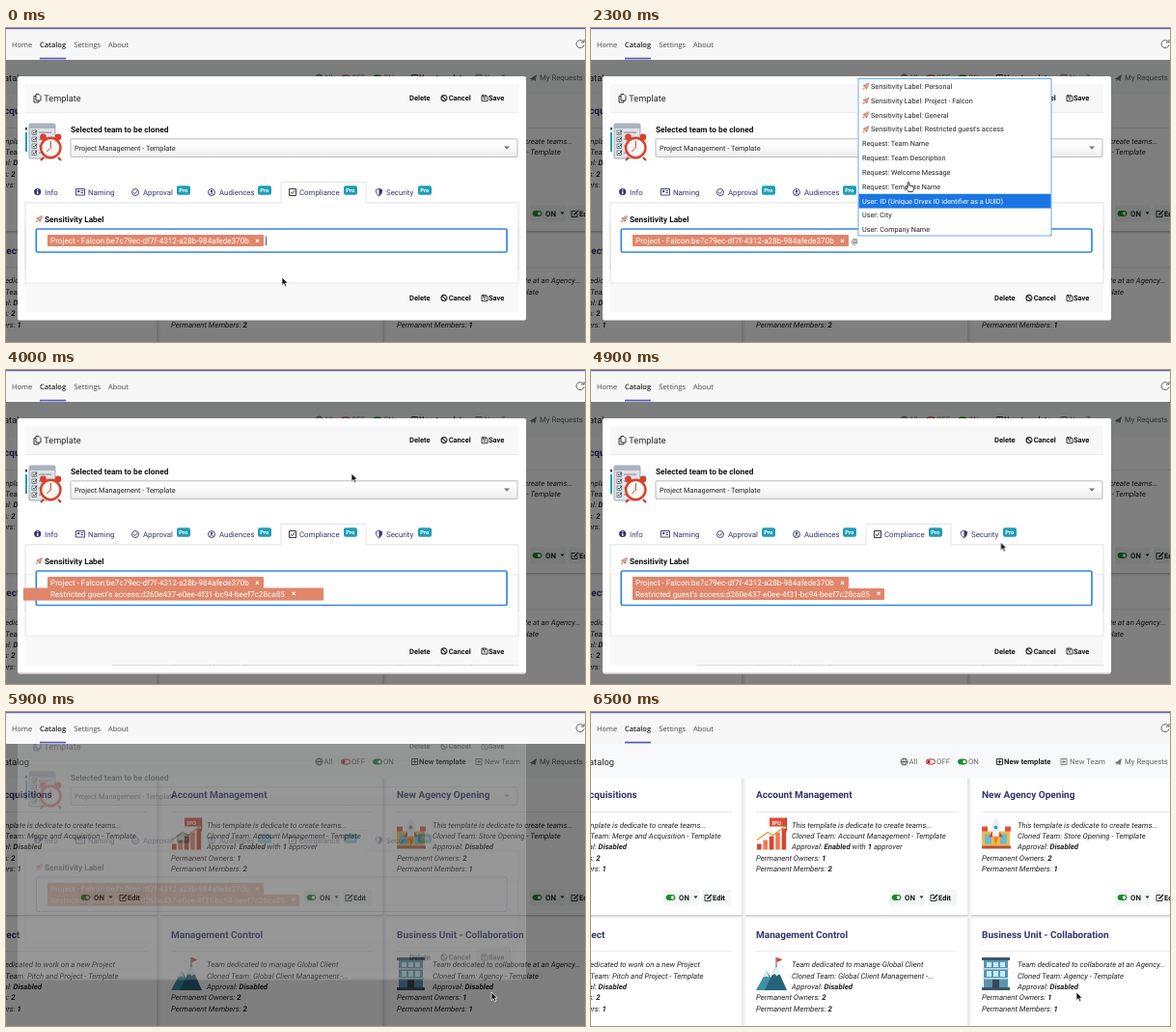
Animation, 600 px wide and 325 px high, one loop 6600 ms. Source, as an HTML page:

```html
<!DOCTYPE html>
<html lang="en">
<head>
<meta charset="utf-8">
<title>Template dialog</title>
<style>
html, body { margin: 0; width: 100%; height: 100%; overflow: hidden; background: #fff; }
svg { display: block; width: 600px; height: 325px; }
text { font: 7.8px Roboto, sans-serif; fill: #222; text-rendering: geometricPrecision; white-space: pre; }
.b, .k { font-weight: 700; }
.nav { font: 7.45px "Open Sans", sans-serif; fill: #444; }
.on { font-weight: 600; fill: #222; }
.title { font-size: 10.05px; font-weight: 700; fill: #34356b; }
.card { font-style: italic; }
.page { font-size: 9.3px; }
.head { font-size: 9.2px; }
.label { font-size: 8.3px; font-weight: 700; fill: #111; }
.btn { font-size: 7.5px; font-weight: 700; fill: #111; }
.sel { font-size: 7.36px; }
.tab { fill: #34356b; font-size: 7.85px; }
.pro { font-size: 5.8px; font-weight: 700; fill: #fff; }
.tag { font-size: 8.13px; fill: #fff; }
.opt { font-size: 7.25px; }
.dim { fill: #666; }
.ln { fill: none; stroke: #222; stroke-width: .9; }
.tl { fill: none; stroke: #34356b; stroke-width: .9; }

.step { animation: 6.6s step-end infinite; }
.move { animation: 6.6s linear infinite; }
#modal { animation-name: close; }
#shade { animation-name: clear; }
#foot, #page2 { animation-name: grow; }
#box { animation-name: box; }
#tag2 { animation-name: late; }
#tag2 rect { animation-name: bump; transform-origin: 173.5px 232px; }
#caret { animation-name: caret; }
#at { animation-name: at; }
#list { animation-name: list; }
#mark { animation-name: mark; }
#hover { animation-name: hover; }
#cursor { animation-name: path; }
#arrow { animation-name: arrow; }
#beam { animation-name: beam; }
#hand { animation-name: hand; }

@keyframes close {
  0%, 87% { opacity: 1; transform: translateY(0); }
  89.39% { opacity: .2; transform: translateY(-37px); }
  90.2%, 100% { opacity: 0; transform: translateY(-44px); }
}
@keyframes clear { 0%, 89.5% { opacity: .5; } 93%, 100% { opacity: 0; } }
@keyframes grow { 0% { transform: none; } 60.5%, 100% { transform: translateY(11.5px); } }
@keyframes box {
  0% { height: 24px; stroke: #3586e4; stroke-width: 1.7; }
  60.5% { height: 35.5px; stroke: #3586e4; stroke-width: 1.7; }
  83.3%, 100% { height: 35.5px; stroke: #8ba9cf; stroke-width: .9; }
}
@keyframes late { 0% { visibility: hidden; } 60.5%, 100% { visibility: visible; } }
@keyframes bump {
  0%, 60.7% { transform: scale(1.192, 1.08); }
  62.8% { transform: scale(.97, 1); }
  64.5%, 100% { transform: none; }
}
@keyframes caret { 0% { visibility: visible; } 22.7%, 100% { visibility: hidden; } }
@keyframes at { 0% { visibility: hidden; } 22.7% { visibility: visible; } 60.5%, 100% { visibility: hidden; } }
@keyframes list { 0% { visibility: hidden; } 24.2% { visibility: visible; } 60.5%, 100% { visibility: hidden; } }
@keyframes mark {
  0% { --i: -1; } 31% { --i: 10; } 32.6% { --i: 9; } 33.4% { --i: 8; }
  36.4% { --i: 7; } 40.9% { --i: 6; } 43.2% { --i: 5; } 45% { --i: 4; } 46.9%, 100% { --i: 3; }
}
@keyframes hover { 0% { visibility: hidden; } 79.5%, 100% { visibility: visible; } }
@keyframes path {
  0%, 1.515% { transform: translate(286px, 258px); }
  3.03%, 7.576% { transform: translate(287px, 244px); }
  10.606% { transform: translate(291px, 224px); }
  16.667%, 28.788% { transform: translate(295px, 218px); }
  31.818% { transform: translate(305px, 199px); }
  34.848% { transform: translate(329px, 159px); }
  37.879%, 39.394% { transform: translate(335px, 148px); }
  48.485%, 50% { transform: translate(350px, 104px); }
  59.091%, 60.606% { transform: translate(358px, 107px); }
  69.697%, 71.212% { transform: translate(385px, 122px); }
  80.303%, 100% { transform: translate(503px, 290px); }
}
@keyframes arrow {
  0% { visibility: visible; } 9.09% { visibility: hidden; } 60.5% { visibility: visible; }
  79.5% { visibility: hidden; } 88.6%, 100% { visibility: visible; }
}
@keyframes beam { 0% { visibility: hidden; } 9.09% { visibility: visible; } 31.06%, 100% { visibility: hidden; } }
@keyframes hand {
  0% { visibility: hidden; } 31.06% { visibility: visible; } 60.5% { visibility: hidden; }
  79.5% { visibility: visible; } 88.6%, 100% { visibility: hidden; }
}
</style>
</head>
<body>
<svg id="stage" viewBox="0 0 600 325"></svg>
<script>
const text = (x, y, s, cls = "") => `<text x="${x}" y="${y}" class="${cls}">${s}</text>`;
const rect = (x, y, w, h, fill, more = "") =>
  `<rect x="${x}" y="${y}" width="${w}" height="${h}" fill="${fill}" ${more}/>`;
const line = (d, cls = "ln", more = "") => `<path d="${d}" class="${cls}" ${more}/>`;
const fill = (d, color) => `<path d="${d}" fill="${color}"/>`;
const dot = (x, y, r, color, more = "") => `<circle cx="${x}" cy="${y}" r="${r}" fill="${color}" ${more}/>`;
const at = (x, y, s) => `<g transform="translate(${x} ${y})">${s}</g>`;
const bold = s => `<tspan class="k">${s}</tspan>`;

const toggle = (x, y, color, on) =>
  rect(x, y - 2.5, 9, 5, on ? color : "#fff", `rx="2.5" stroke="${color}"`) +
  dot(on ? x + 6.5 : x + 2.5, y, 1.7, on ? "#fff" : color);
const pencil = (x, y) => line(`M${x + 4} ${y - 2.5}h-4v6h6v-3`) + line(`M${x + 2.5} ${y + 1.5}l4.5-4.5`, "ln", 'style="stroke-width:1.6"');
const plus = (x, y, cls) => line(`M${x} ${y - 3}h6v6h-6zM${x + 3} ${y - 2}v4m-2-2h4`, cls);
const rocket = (x, y) => at(x, y,
  fill("M7.5 0C4.5 0 2.5 2 1.6 4.2l1.9 1.9C5.7 5.2 7.7 3.2 7.5 0z", "#c9a9a4") +
  fill("M3.4 1.8L.8 3l1.2 1zM5.9 4.2L4.7 6.9l-1-1.3z", "#d5452f") + fill("M1.5 4.8L0 7.7l2.9-1.5z", "#ef8a3a"));

// Card pictures, drawn from their top left corner
const chart = [0, 1, 2, 3, 4].map(i =>
  rect(i * 6.4 + 1, 27 - i * 4, 4.6, 6 + i * 4, i % 2 ? "#ef7b52" : "#d9452f")).join("") +
  line("M1 23L12 15L18 18L31 8", "ln", 'style="stroke:#e39a3c;stroke-width:1.3"') +
  rect(14, 0, 18, 9, "#e04a35") + text(16.5, 7, "IPO", "pro") + rect(31, 0, 1.2, 14, "#8a5a4a");
const store = rect(0, 10, 29, 20, "#f2b84b") + rect(0, 29, 30, 3, "#b5523b") +
  [0, 1, 2, 3, 4].map(i => rect(i * 6, 9, 6, 5, i % 2 ? "#fff" : "#e2503c")).join("") +
  rect(3, 17, 7, 10, "#66bcd0") + rect(19, 17, 7, 10, "#66bcd0") +
  fill("M14.5 0c5 5 5 12 3.5 19h-7C9.500 12 9.500 5 14.500 0z", "#eceff3") +
  dot(14.5, 10, 2, "#3aa0c4") + fill("M11 14l-4 6h4zM18 14l4 6h-4z", "#d9452f") + fill("M12 20h5l-2.500 8z", "#ef7b2a");
const peak = fill("M0 34L11 14L18 25L23 34z", "#3f8fa3") + fill("M9 34L21 9L32 34z", "#24637a") +
  fill("M21 9l-4.500 9.500 3-1.500 2 2.500 2-2 2.500 1zM11 14l-3.500 6.500 3.500-1 2.500 1.500z", "#e7f1f4") +
  rect(20.5, 0, 1, 10, "#555") + fill("M21.500 0l6 2.500-6 2.500z", "#e23b30");
const tower = rect(2, 2, 25, 30, "#5d93ad") + rect(0, 0, 29, 3, "#3c566b") + rect(0, 31, 29, 3, "#3c566b") +
  rect(11, 23, 7, 9, "#34485b") + rect(1, 11, 27, 1.5, "#c9dbe4") + rect(1, 21, 27, 1.5, "#c9dbe4") +
  [5, 12, 19].map(x => rect(x, 5, 5, 5, "#baf0f6") + rect(x, 14, 5, 6, "#baf0f6")).join("");

function card(x, y, c) {
  const [title, desc, team, state, owners, members, pic] = c;
  return at(x, y,
    rect(0, 0, 231, 141.5, "#fff") + rect(0, 141.3, 231, 1, "#bbb") + rect(230.5, 0, .8, 141.5, "#ccc") +
    rect(11, 34, 209, .7, "#ddd") + text(11, 20, title, "title") + at(11, 40.5, pic) +
    text(48, 50.7, desc, "card") + text(48, 62.2, "Cloned Team: " + team, "card") +
    text(48, 73.4, "Approval: " + state, "card") +
    text(11, 84.7, "Permanent Owners: " + bold(owners), "card") +
    text(11, 96, "Permanent Members: " + bold(members), "card") +
    rect(149, 114.5, 37, 17, "#f4f5f6", 'rx="2"') + rect(189, 114.5, 30, 17, "#f4f5f6", 'rx="2"') +
    toggle(152, 123, "#1d8a2c", true) + text(165, 125.7, "ON", "b") +
    fill("M180.500 121.500h4l-2 2.400z", "#222") + pencil(192, 123) + text(200, 125.7, "Edit", "btn"));
}

const off = bold("Disabled");
const rows = [
  [["Merger and Acquisitions", "This template is dedicate to create teams...", "Merge and Acquisition - Template", off, 2, 1, ""],
   ["Account Management", "This template is dedicate to create teams...", "Account Management - Template",
    bold("Enabled") + " with " + bold(1) + " approver", 1, 2, chart],
   ["New Agency Opening", "This template is dedicate to create teams...", "Store Opening - Template", off, 2, 1, store]],
  [["Pitch and Project", "Team dedicated to work on a new Project", "Pitch and Project - Template", off, 2, 1, ""],
   ["Management Control", "Team dedicated to manage Global Client", "Global Client Management -...", off, 2, 2, peak],
   ["Business Unit - Collaboration", "Team dedicated to collaborate at an Agency...", "Agency - Template", off, 1, 1, tower]]
];

const catalog = rect(0, 33, 600, 292, "#f3f3f5") + rect(0, 33, 600, 36, "#f8f9fa") +
  text(-8, 55, "Catalog", "page") +
  line("M321 51.500a3.500 3.500 0 1 0 7 0a3.500 3.500 0 1 0-7 0h7M324.500 48c-2 2-2 5 0 7c2-2 2-5 0-7", "ln", 'style="stroke:#555"') +
  text(329.5, 54.3, "All", "dim") + toggle(347.5, 51.5, "#b3261e", false) + text(358, 54.3, "OFF", "dim") +
  toggle(380.5, 51.5, "#1d8a2c", true) + text(391, 54.3, "ON", "dim") +
  plus(420.5, 51.5, "ln") + text(428, 54.3, "New template", "b") +
  line("M487 48.500h6v6h-6zM490 49.500v4m-2-2h4", "ln", 'style="stroke:#777"') + text(496, 54.3, "New Team", "dim") +
  fill("M542.500 53l7.500-5-1.500 7-2.500-1.500-1.500 1.800v-2.300z", "#777") + text(553, 54.3, "My Requests", "dim") +
  rows.map((r, j) => r.map((c, i) => card(-74 + 234 * i, 69 + 144.5 * j, c)).join("")).join("");

const header = rect(0, 0, 600, 33, "#f7f7f8") + rect(0, 0, 600, 1.2, "#6265b5") +
  text(6, 20, "Home", "nav") + text(35, 20, "Catalog", "nav on") + text(70.5, 20, "Settings", "nav") +
  text(106, 20, "About", "nav") + rect(35, 30.7, 27, 1.7, "#5558b8") +
  line("M598.500 14.500a4 4 0 1 0 .5 3M599 12v3h-3", "ln", 'style="stroke:#555"');

const clock = rect(24, 99, 27, 36, "#dfe3e8", 'rx="1.5" stroke="#8c97a3" stroke-width=".8"') + rect(24, 99, 27, 5, "#aab4be") +
  [106, 113, 120, 127].map((y, i) => rect(27, y, 4.5, 4.5, "#fff", 'stroke="#456" stroke-width=".7"') +
    line(`M28 ${y + 2}l1.300 1.300 2.500-3.500`) + rect(34, y + 1.5, 13 - i, 1.2, "#8c97a3")).join("") +
  rect(20, 103, 2, 2.5, "#234") + rect(20, 108, 2, 20, "#259db3") +
  line("M39 134l-3 3M54 134l3 3", "ln", 'style="stroke:#c23a2c;stroke-width:2"') +
  dot(38.5, 113, 3.4, "#d8412f") + dot(54, 113, 3.4, "#d8412f") +
  dot(46.3, 124, 10.2, "#fbf7f2", 'stroke="#d8412f" stroke-width="2.4"') +
  line("M46.300 117v7l-4 4", "ln", 'style="stroke:#933"');

const actions = y => text(418, y, "Delete", "btn") +
  line(`M451 ${y - 2.6}a3 3 0 1 0 6 0a3 3 0 1 0-6 0M452 ${y - 4.6}l4 4`, "ln", 'style="stroke-width:1.100"') + text(458.7, y, "Cancel", "btn") +
  line(`M493 ${y - 5.5}h4.500l1.500 1.500v4.500h-6zM494.500 ${y - 5.5}v2h2.500v-2M494.800 ${y - 1.6}h2.400`) + text(500, y, "Save", "btn");

const tabs = [["Info", 40], ["Naming", 85], ["Approval", 142, 177], ["Audiences", 221, 261],
  ["Compliance", 304, 350], ["Security", 394, 427]].map(([s, x, p]) =>
  text(x, 172.7, s, "tab") + (p ? rect(p, 163.3, 14, 9.4, "#1f9db5", 'rx="2"') + text(p + 2.2, 170, "Pro", "pro") : "")).join("");
const tabIcons = dot(32.7, 169.5, 3.6, "#34356b") + rect(32.1, 169, 1.3, 3, "#fff") + rect(32.1, 166.9, 1.3, 1.3, "#fff") +
  line("M72.500 166.500h9v6.500h-9zM77.500 168.500h2.500m-2.500 2h2.500", "tl") + dot(75.2, 169, 1.2, "#34356b") +
  line("M130.500 170a3.500 3.500 0 1 0 7 0a3.500 3.500 0 1 0-7 0M132 170l1.500 1.500 2.700-3", "tl") +
  line("M209.500 170a3.500 3.500 0 1 0 7 0a3.500 3.500 0 1 0-7 0M211 172.500c1-2 3-2 4 0", "tl") + dot(213, 169, 1.2, "#34356b") +
  line("M293.500 166.500h7v7h-7zM295 170l1.500 1.500 2.700-3.500", "ln") +
  line("M386.500 166.200l3.200 1.300c0 3-1 5-3.200 6.200c-2.200-1.200-3.200-3.200-3.200-6.200z", "tl") +
  fill("M386.500 166.200l3.200 1.300c0 3-1 5-3.200 6.200z", "#34356b");

const modal = `<g id="modal" class="move">
  ${rect(12, 50, 527, 240, "#fff", 'rx="2"')}
  <g id="page2" class="step">${rect(12, 270, 527, 32.5, "#fff", 'rx="2"')}
    ${rect(20, 200, 511, 64, "#fff", 'stroke="#dcdcdc" stroke-width=".8"')}</g>
  ${rect(20, 58, 511, 29, "#f8f8f8")}${rect(20, 87, 511, .7, "#e4e4e4")}
  ${line("M31 68.500h3l2 2v4.500h-5zM31 70.500h-2v6.500h5v-2")}${text(39.3, 76, "Template", "head")}${actions(75.2)}
  ${clock}${text(67, 107.6, "Selected team to be cloned", "label")}
  ${rect(67, 114.8, 463, 18.6, "url(#fade)", 'stroke="#aaa" stroke-width=".8" rx="1"')}
  ${text(71, 127, "Project Management - Template", "sel")}${fill("M516 122.500h6l-3 3.200z", "#777")}
  ${rect(20, 180.8, 511, 25, "#fff")}${line("M20 250V180.800H285V159.500H373V180.800H531V250", "ln", 'style="stroke:#d8dce0;stroke-width:.8"')}
  ${tabs}${tabIcons}
  ${rocket(30.5, 194)}${text(40, 200.6, "Sensitivity Label", "label")}
  <rect id="box" class="step" x="31.300" y="208" width="487.700" height="24" rx="1.500" fill="#fff"/>
  ${rect(43, 214, 224, 12, "#e0866b", 'rx="1"')}
  ${text(46, 222.9, "Project - Falcon:be7c79ec-df7f-4312-a28b-984afede370b", "tag")}${text(258.3, 222.6, "×", "tag b")}
  <g id="tag2" class="step"><rect class="move" x="43" y="226" width="261" height="12" rx="1" fill="#e0866b"/>
    ${text(46, 234.7, "Restricted guest's access:d260e437-e0ee-4f31-bc94-beef7c28ca85", "tag")}${text(296, 234.4, "×", "tag b")}</g>
  <rect id="caret" class="step" x="269.300" y="215.500" width=".8" height="9.500" fill="#222"/>
  <text id="at" class="step sel" x="270" y="222.600">@</text>
  <g id="foot" class="step">${rect(20, 265, 511, 29, "#f8f8f8")}
    <g id="hover" class="step">${rect(488, 270, 35, 21.5, "#bbb", 'rx="2"')}${rect(487, 268.5, 35, 21, "#e2e4e7", 'rx="2"')}</g>
    ${actions(282)}</g>
</g>`;

const options = ["Sensitivity Label: Personal", "Sensitivity Label: Project - Falcon", "Sensitivity Label: General",
  "Sensitivity Label: Restricted guest's access", "Request: Team Name", "Request: Team Description",
  "Request: Welcome Message", "Request: Template Name", "User: ID (Unique Orvex ID identifier as a UUID)",
  "User: City", "User: Company Name"];
const top0 = 53, pitch = 14.84;
const items = options.map((s, i) => {
  const y = top0 + pitch * i, label = i < 4;
  return `<g class="item">${rect(277.5, y, 199, pitch, "#1a76e3", `style="opacity:calc(1 - min(1, max(var(--i) - ${i}, ${i} - var(--i))))"`)}
    ${label ? rocket(281, y + 3.6) : ""}<text x="${label ? 290 : 281}" y="${y + 9.9}" class="opt"
    style="fill:color-mix(in srgb, #fff calc(100% * (1 - min(1, max(var(--i) - ${i}, ${i} - var(--i))))), #222)">${s}</text></g>`;
}).join("");
const list = `<g id="list" class="step">${rect(277, 52.5, 200, 162.5, "#fff", 'stroke="#5d9fe6" stroke-width=".9"')}
  <g id="mark" class="step">${items}</g></g>`;

const cursor = `<g id="cursor" class="move">
  <path id="arrow" class="step" d="M0 0v8.500l2-1.900 1.400 3.100 1.500-.7-1.400-3h2.700z" fill="#111" stroke="#fff" stroke-width=".7"/>
  <path id="beam" class="step" d="M-2-4.500q2 0 2 1.500q0-1.500 2-1.500M0-3v6M-2 4.500q2 0 2-1.500q0 1.500 2 1.500M-1 1h2" fill="none" stroke="#111" stroke-width=".9"/>
  <path id="hand" class="step" d="M-.9 1q.9-1.500 1.800 0v3.200q1.200-.7 1.600.3q1.200-.5 1.500.5q1.200-.3 1.300.8v2.200q-.2 1.500-1 2.500h-4.300q-1.200-2-2.900-3.900q.3-1.400 2 0z" fill="#fff" stroke="#111" stroke-width=".8"/>
</g>`;

document.getElementById("stage").innerHTML =
  `<defs><linearGradient id="fade" x2="0" y2="1"><stop offset=".2" stop-color="#fff"/><stop offset="1" stop-color="#eee"/></linearGradient></defs>` +
  catalog + `<rect id="shade" class="move" y="33" width="600" height="292" fill="#000"/>` + modal + header + list + cursor;
</script>
</body>
</html>
```
